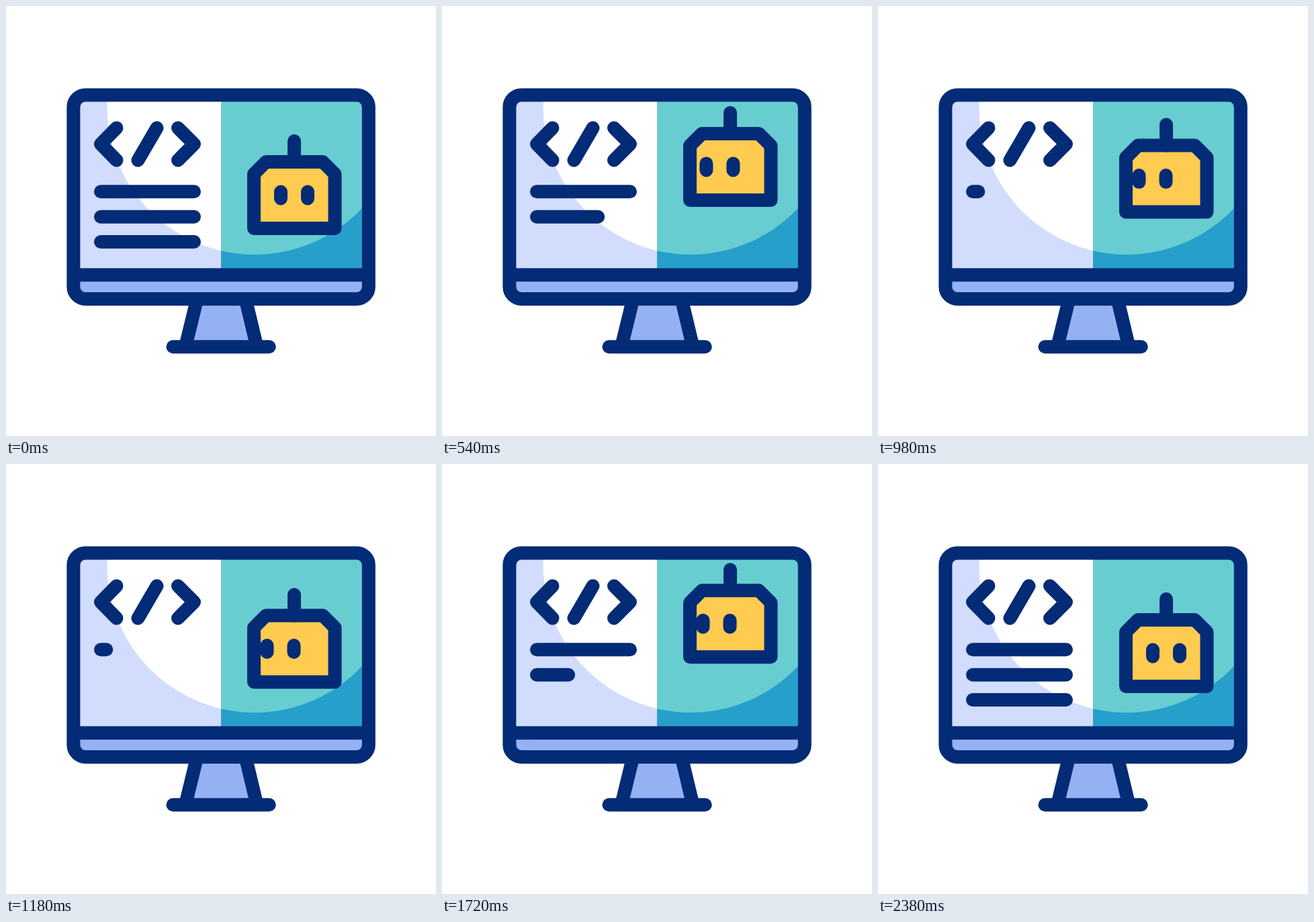
An HTML page for the animation above (2400 ms loop, 640 by 640 pixels).

```html
<!DOCTYPE html>
<html lang="en">
<head>
<meta charset="utf-8">
<title>Coding robot</title>
<style>
  html, body { margin: 0; width: 100%; height: 100%; overflow: hidden; background: #fff; }
  svg { display: block; width: 100vw; height: 100vh; }
  .ink { fill: none; stroke: #032b76; stroke-width: 20; stroke-linecap: round; stroke-linejoin: round; }
</style>
</head>
<body>
<svg viewBox="0 0 640 640">
  <clipPath id="screen"><rect x="104" y="136" width="432" height="296" rx="14"/></clipPath>
  <clipPath id="left"><rect x="100" y="132" width="220" height="268"/></clipPath>
  <clipPath id="right"><rect x="320" y="132" width="220" height="268"/></clipPath>

  <path fill="#94b1f4" d="M283 440H357L371 503H269Z"/>
  <path class="ink" d="M283.4 440L268.5 501M357.4 440L372 501M248.5 507.3H391.7"/>

  <g clip-path="url(#screen)">
    <rect x="100" y="132" width="220" height="268" fill="#d2dcfd"/>
    <rect x="320" y="132" width="220" height="268" fill="#279fcb"/>
    <circle cx="370" cy="150.5" r="219.5" fill="#fff" clip-path="url(#left)"/>
    <circle cx="370" cy="150.5" r="219.5" fill="#68cdd1" clip-path="url(#right)"/>
    <rect x="100" y="400" width="440" height="36" fill="#94b1f4"/>
  </g>
  <rect class="ink" x="100.4" y="132.4" width="439.4" height="303.6" rx="18"/>
  <path class="ink" d="M101 400.3H539"/>

  <path class="ink" d="M164.5 181.5L141 205.5L164.5 229.5M224.5 181.5L196.5 229.5M256 181.5L280 205.5L256 229.5"/>
  <g id="lines"></g>

  <g id="robot">
    <path class="ink" fill="#ffcb50" style="fill:#ffcb50" d="M369 331V250L387 232H471.5L489.5 250V331Z"/>
    <path class="ink" d="M429 201V232"/>
    <path id="eyes" class="ink" d="M409 276.5V286.5M449 276.5V286.5"/>
  </g>
</svg>
<script>
  const LOOP = 2400, LINE = 139, STUB = 0.06, LIFT = 45.5, LOOK = 20.5;
  const robot = document.getElementById('robot');
  const eyes = document.getElementById('eyes');
  const group = document.getElementById('lines');

  const lines = [276.3, 313.8, 351].map(y => {
    const path = document.createElementNS('http://www.w3.org/2000/svg', 'path');
    path.setAttribute('class', 'ink');
    group.appendChild(path);
    return { path, y };
  });

  // Smooth 0 to 1 between two times
  const ease = (t, from, to) => {
    const u = Math.min(1, Math.max(0, (t - from) / (to - from)));
    return u * u * (3 - 2 * u);
  };

  // Lines are erased from the bottom up, then typed from the top down
  function lineLength(t, i) {
    const erase = 290 + (2 - i) * 180;
    const type = 1415 + i * 220;
    const least = i === 0 ? STUB : 0;
    const shown = 1 - ease(t, erase, erase + 180) + ease(t, type, type + 220);
    return least + (1 - least) * shown;
  }

  function draw(t) {
    lines.forEach(({ path, y }, i) => {
      const k = lineLength(t, i);
      path.setAttribute('d', `M141 ${y}H${141 + LINE * k}`);
      path.style.display = k > 0.001 ? '' : 'none';
    });
    const lift = ease(t, 0, 650) - ease(t, 650, 1346) + ease(t, 1346, 1681) - ease(t, 1681, 2016);
    const look = ease(t, 350, 630) - ease(t, 1980, 2260);
    robot.setAttribute('transform', `translate(0 ${-LIFT * lift})`);
    eyes.setAttribute('transform', `translate(${-LOOK * look} 0)`);
  }

  const start = performance.now();
  function tick() {
    draw((performance.now() - start) % LOOP);
    requestAnimationFrame(tick);
  }
  draw(0);
  requestAnimationFrame(tick);
</script>
</body>
</html>
```
